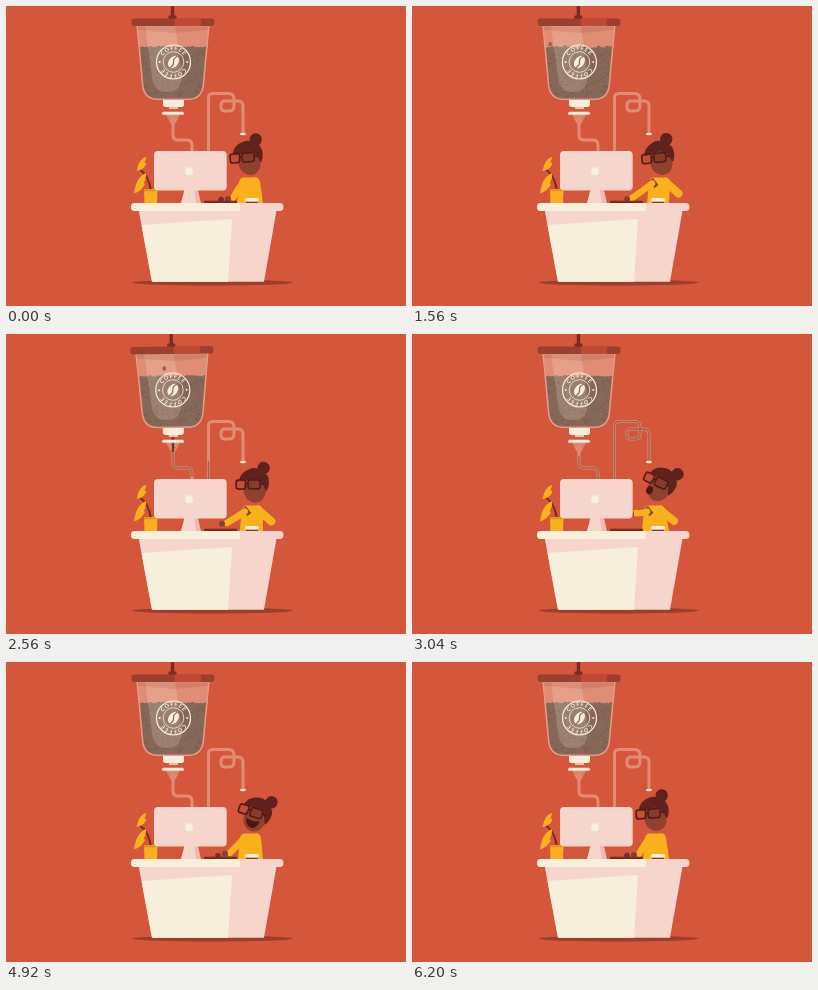
Animation of 400x300 px, one loop 6.24 s. Source, as an HTML page:

```html
<!DOCTYPE html>
<html lang="en">
<head>
<meta charset="utf-8">
<title>Coffee desk</title>
<style>
html, body { margin: 0; width: 100%; height: 100%; overflow: hidden; background: #d4573b; }
svg { display: block; width: 100vw; height: 100vh; }
text { font: 700 5.4px Lato, sans-serif; fill: #f6eedb; }
</style>
</head>
<body>
<svg viewBox="0 0 400 300">
  <defs>
    <clipPath id="inside"><path d="M132 20L137.500 79Q139 92.500 152 92.500H182Q195 92.500 196.500 79L202 20Z"/></clipPath>
    <path id="topArc" d="M155.500 56A12 12 0 0 1 179.500 56"/>
    <path id="lowArc" d="M179.500 56A12 12 0 0 1 155.500 56"/>
  </defs>
  <rect width="400" height="300" fill="#d4573b"/>
  <ellipse cx="206.500" cy="276.600" rx="80.500" ry="3" fill="#9d3e2c"/>

  <g fill="none" stroke-linejoin="round">
    <g id="pipes" stroke="#e28c76" stroke-width="3"></g>
    <g id="streams" stroke="#a0604d" stroke-width="1.500"></g>
  </g>
  <path d="M160 108.500H174L168.500 119H165.500Z" fill="#dd8871"/>
  <g id="falling" fill="#63382e"></g>
  <rect x="156" y="105.700" width="22" height="3" rx="1.500" fill="#f6eedb"/>
  <ellipse cx="237" cy="128" rx="3" ry="1.200" fill="#f6eedb"/>

  <g id="machine">
    <rect x="164.800" y="-20" width="3.400" height="34" fill="#7c2b21"/>
    <path d="M162.500 13V10.500Q162.500 9.500 163.500 9.500H169.500Q170.500 9.500 170.500 10.500V13Z" fill="#7c2b21"/>
    <path d="M157 93H178V98.500Q178 101 175.500 101H172V103H163V101H159.500Q157 101 157 98.500Z" fill="#f6eedb"/>
    <path d="M163 101H172V103H163Z" fill="#eec0b2"/>
    <path d="M131 20L136.500 79Q138 93.500 152 93.500H182Q196 93.500 197.500 79L203 20Z" fill="#e08d76" stroke="#dfa08c" stroke-width="1.200"/>
    <g clip-path="url(#inside)">
      <path id="beans" fill="#866858"/>
      <g id="specks" fill="#6f5145" opacity=".4"></g>
      <path d="M139 20H169L176 68Q176 86 161.500 86Q148 86 146.500 74Z" fill="#fff0e0" opacity=".18"/>
      <path d="M131 20H203V24L169 27L131 24Z" fill="#8a3a2a" opacity=".16"/>
    </g>
    <rect x="125.500" y="12.500" width="83" height="7.500" rx="3" fill="#9b3f2f"/>
    <path d="M169 12.500H195V20H169Z" fill="#bd4b33"/>
    <g fill="none" stroke="#f6eedb">
      <circle cx="167.500" cy="56" r="17" stroke-width="1.200"/>
      <circle cx="167.500" cy="56" r="10.300" stroke-width=".8"/>
    </g>
    <g fill="#f6eedb"><circle cx="153.700" cy="56" r="1"/><circle cx="181.300" cy="56" r="1"/></g>
    <g transform="rotate(35 167.500 56)">
      <ellipse cx="167.500" cy="56" rx="4.700" ry="6.800" fill="#f6eedb"/>
      <path d="M167.500 49Q165 53 167.500 56T167.500 63" fill="none" stroke="#866858" stroke-width="1.200"/>
    </g>
    <text text-anchor="middle" letter-spacing=".8"><textPath href="#topArc" startOffset="50%">COFFEE</textPath></text>
    <text text-anchor="middle" letter-spacing=".8"><textPath href="#lowArc" startOffset="50%">COFFEE</textPath></text>
  </g>

  <g id="person">
    <path id="backArm" fill="none" stroke="#f8b01d" stroke-width="8" stroke-linecap="round"/>
    <path id="torso" fill="#f8b01d"/>
    <path id="neck" stroke="#8a3f2e" stroke-width="5" fill="none"/>
    <circle id="farHand" r="2.800" fill="#743126"/>
    <path id="frontArm" fill="none" stroke="#f8b01d" stroke-width="6.500" stroke-linecap="round"/>
    <circle id="hand" r="3" fill="#8a3f2e"/>
    <ellipse id="drop" cx="237" rx="1.100" ry="2.200" fill="#63382e"/>
    <g id="head">
      <circle cx="13.300" cy="-20.500" r="6.200" fill="#5f221c"/>
      <ellipse cx="0.500" cy="-0.500" rx="11" ry="12.800" fill="#8f4130"/>
      <path d="M-13 -13Q-10 -20 -3 -21.500Q4 -24 10 -19Q18 -13 16 -6Q15 0 11.500 3L9 -6Q7 -11 1 -11.500Q-6 -10 -13 -13Z" fill="#5f221c"/>
      <ellipse id="sip" cx="-7.500" cy="4" fill="#4a1814"/>
      <path id="smile" d="M-8 0Q-2 3 6 1Q5 9 -1 9Q-7 8 -8 0Z" fill="#4a1814"/>
      <g id="glasses" fill="#5a1c17" fill-opacity=".15" stroke="#541a16" stroke-width="1.600">
        <rect x="-17" y="-11.500" width="9.500" height="9" rx="2.300"/>
        <rect x="-5" y="-11.500" width="12" height="9" rx="2.300"/>
        <path d="M-7.500 -8H-5M7 -8L11 -7" fill="none"/>
      </g>
    </g>
  </g>

  <g id="desk">
    <path d="M145 185Q143 170 134 163.500" fill="none" stroke="#7a2a20" stroke-width="2"/>
    <path d="M140.500 151Q133 152 130.500 165Q138 164 140.500 157.500L138.500 156.500ZM140 167Q130 171 128 187.500Q136 185 139 178L137.500 177Q140.500 173 140 167Z" fill="#f8b01d"/>
    <path d="M138 183H151.500L151 197H138.500Z" fill="#f8b01d"/>
    <path d="M138 184.300H151.500" stroke="#dc8f17" stroke-width="1.800"/>
    <path d="M178.500 184H192L195 197.500H175Z" fill="#efb9ad"/>
    <path d="M178.500 184H188L190 197.500H175Z" fill="#f6d5cd"/>
    <rect x="148" y="145" width="72.700" height="39.600" rx="4" fill="#f6d5cd"/>
    <circle cx="183" cy="165.300" r="4" fill="#f8f0de"/>
    <rect x="198" y="194.800" width="33" height="3" rx="1" fill="#7a2a20"/>
    <rect x="239" y="192" width="14" height="4" rx="2" fill="#f8f0de"/>
    <path d="M240 196.300H252" stroke="#7a2a20" stroke-width="1.200"/>
    <path d="M132.700 204H270.600L258 275.700H146Z" fill="#f6d5cd"/>
    <path d="M135.500 219L226 213L222 275.700H146Z" fill="#f6efdc"/>
    <rect x="125" y="197" width="152.500" height="8" rx="4" fill="#f6d5cd"/>
    <path d="M129 197H234V205H129A4 4 0 0 1 129 197Z" fill="#f6efdc"/>
  </g>
</svg>
<script>
const LOOP = 6240, TAU = Math.PI * 2;
const $ = id => document.getElementById(id);
const set = (el, attrs) => { for (const k in attrs) el.setAttribute(k, attrs[k]); };
const clamp = v => Math.max(0, Math.min(1, v));
const ramp = (t, a, b) => clamp((t - a) / (b - a));
const ease = u => u * u * (3 - 2 * u);
const pulse = (t, a, b, c, d) => ease(ramp(t, a, b)) * (1 - ease(ramp(t, c, d)));

function add(parent, tag, attrs) {
  const el = document.createElementNS('http://www.w3.org/2000/svg', tag);
  set(el, attrs);
  parent.appendChild(el);
  return el;
}

let seed = 7;
const rnd = () => (seed = seed * 16807 % 2147483647) / 2147483647;

// Pipes with the coffee running inside: [path, fill start/end, drain start/end]
const lines = [
  ['M167 118V129Q167 134 172 134H181Q186 134 186 139V147', 2200, 2600, 3000, 3400],
  ['M202.500 147V92Q202.500 87.500 207 87.500H222Q228 87.500 228 93V100Q228 105 223 105H219Q215 105 215 101V99Q215 95 219 95H232Q237 95 237 100V127', 2500, 3020, 3250, 3660]
].map(([d, ...times]) => {
  add($('pipes'), 'path', { d });
  return { el: add($('streams'), 'path', { d, pathLength: 100 }), times };
});

const specks = Array.from({ length: 90 }, () => {
  const x = 136 + rnd() * 62, y = 45 + rnd() * 46;
  return { x, y, p: rnd() * TAU, el: add($('specks'), 'ellipse', { rx: 1.4, ry: 0.9 }) };
});
const bumps = Array.from({ length: 18 }, () => ({ h: rnd() * 1.6, p: rnd() * TAU }));
const falling = Array.from({ length: 6 }, () => add($('falling'), 'ellipse', { rx: 1.3, ry: 1.8 }));
const hop = add($('machine'), 'ellipse', { rx: 1.8, ry: 2.3, fill: '#866858' });

// time, head x, y, turn, shoulders, hand x, y, elbow x, y
const rest = [243, 157, -17, 244, 222, 193, 252, 189];
const press = [249, 157, -20, 248, 215, 193, 266.5, 187.5];
const drink = [246, 155, 20, 243, 219, 180, 262, 187];
const savour = [246, 157, 0, 246, 220, 179, 258, 188];
const happy = [248, 158, 14, 245, 219, 192, 252, 189];
const poses = [
  [0, ...rest], [480, ...rest],
  [760, 248, 156, -16, 247, 222, 184, 264, 184],
  [1060, 249, 155, -19, 248, 221, 179, 265, 184],
  [1180, ...press], [2400, ...press],
  [2900, ...drink], [3600, ...drink],
  [3900, ...savour], [4120, ...savour],
  [4500, ...happy], [5580, ...happy],
  [5980, ...rest], [LOOP, ...rest]
];

function poseAt(t) {
  let i = 0;
  while (t >= poses[i + 1][0]) i++;
  const a = poses[i], b = poses[i + 1], u = ease(ramp(t, a[0], b[0]));
  return a.slice(1).map((v, k) => v + (b[k + 1] - v) * u);
}

function drawMachine(t) {
  const amp = 4.2 * ramp(t, 1240, 1300) * (1 - ramp(t, 1900, 2760));
  const turn = -amp * Math.sin(TAU * (t - 1240) / 320);
  set($('machine'), { transform: `rotate(${turn} 167 110)` });

  const shake = amp / 4.2;
  const level = 40 + 1.3 * pulse(t, 1700, 2800, 3700, 4080);
  let d = 'M130 100';
  bumps.forEach((b, i) => {
    const x = 130 + i * 4.2;
    const y = level + b.h + shake * Math.sin(t / 45 + b.p);
    d += `L${x} ${y}Q${x + 2} ${y - 1.5} ${x + 4.2} ${y}`;
  });
  set($('beans'), { d: d + 'L206 100Z' });
  for (const s of specks)
    set(s.el, { cx: s.x + shake * Math.sin(t / 50 + s.p), cy: s.y + shake * Math.cos(t / 43 + s.p) });
  const jump = Math.max(0, t - 1540) % 400 / 400;
  set(hop, { cx: 136 + jump * 42, cy: 39 - 18 * jump * (1 - jump), opacity: t > 1540 && t < 2740 ? 1 : 0 });

  falling.forEach((el, i) => {
    const u = (t / 300 + i / 6) % 1, born = t - u * 300;
    set(el, { cx: 167 + Math.sin(i * 2.4) * (1 - u), cy: 101 + u * 18, opacity: born > 1720 && born < 2650 ? 1 : 0 });
  });
  for (const { el, times: [a, b, c, e] } of lines) {
    const head = 100 * ramp(t, a, b), tail = 100 * ramp(t, c, e);
    const on = head - tail > 0.1;
    set(el, { 'stroke-dasharray': `${on ? head - tail : 1} 300`, 'stroke-dashoffset': -tail, opacity: on ? 1 : 0 });
  }
}

function drawPerson(t) {
  let [x, y, turn, s, hx, hy, ex, ey] = poseAt(t);
  const typing = pulse(t, 4560, 4700, 5700, 5900);
  const gulp = pulse(t, 3020, 3120, 3500, 3640);
  const wobble = pulse(t, 1240, 1320, 2100, 2500);
  const joy = pulse(t, 4400, 4560, 5560, 5740);
  y += joy * 0.8 * Math.sin(t / 80) + gulp * 0.5 * Math.sin(t / 55);
  turn += joy * 2 * Math.sin(t / 160) + wobble * 0.6 * Math.sin(t / 51);
  const tap = typing * 1.6 * Math.sin(t / 28);
  const atKeys = 1 - ease(ramp(t, 480, 640)) + ease(ramp(t, 4420, 4600));

  set($('head'), { transform: `translate(${x} ${y}) rotate(${turn})` });
  set($('glasses'), { transform: `rotate(${5 + Math.max(0, -turn * 0.45)} -5 -7)` });
  set($('torso'), { d: `M${s - 13} 197L${s - 11} 176Q${s - 10} 171.500 ${s - 6} 171.500H${s + 6}Q${s + 9} 171.500 ${s + 10} 176L257 197Z` });
  set($('neck'), { d: `M${s - 9} 173.500L${s - 3.500} 180.500`, opacity: clamp(1 - atKeys) });
  set($('backArm'), { d: `M${s + 5} 175.500L${ex} ${ey}` });

  const sx = s - 8, mx = (sx + hx) / 2 + 1, my = (177 + hy) / 2 + 1.5;
  set($('frontArm'), { d: `M${sx} 177.500Q${mx} ${my} ${hx + 5} ${hy - 1 + tap * 0.3}` });
  set($('hand'), { cx: hx, cy: hy + tap });
  set($('farHand'), { cx: hx - 7, cy: 193.5 - tap, opacity: clamp(atKeys) });

  const open = pulse(t, 2620, 2860, 3560, 3760);
  const sipping = pulse(t, 3600, 3760, 4200, 4400);
  set($('sip'), { rx: 3.4 * open + 2.4 * sipping, ry: 4.2 * open + 1.5 * sipping });
  set($('smile'), { opacity: joy > 0.02 ? 1 : 0, transform: `translate(-1 4) scale(${0.5 + joy / 2} ${joy}) translate(1 -4)` });

  const u = t % 150 / 150;
  set($('drop'), { cy: 130 + u * 26, opacity: t > 3060 && t < 3660 ? 1 : 0 });
}

function draw(t) {
  drawMachine(t);
  drawPerson(t);
  const since = t - 1160;
  const jolt = since > 0 && since < 360 ? 2.2 * Math.sin(since / 32) * (1 - since / 360) ** 2 : 0;
  set($('desk'), { transform: `translate(0 ${jolt})` });
}

const start = performance.now();
function frame() {
  draw((performance.now() - start) % LOOP);
  requestAnimationFrame(frame);
}
frame();
</script>
</body>
</html>
```
